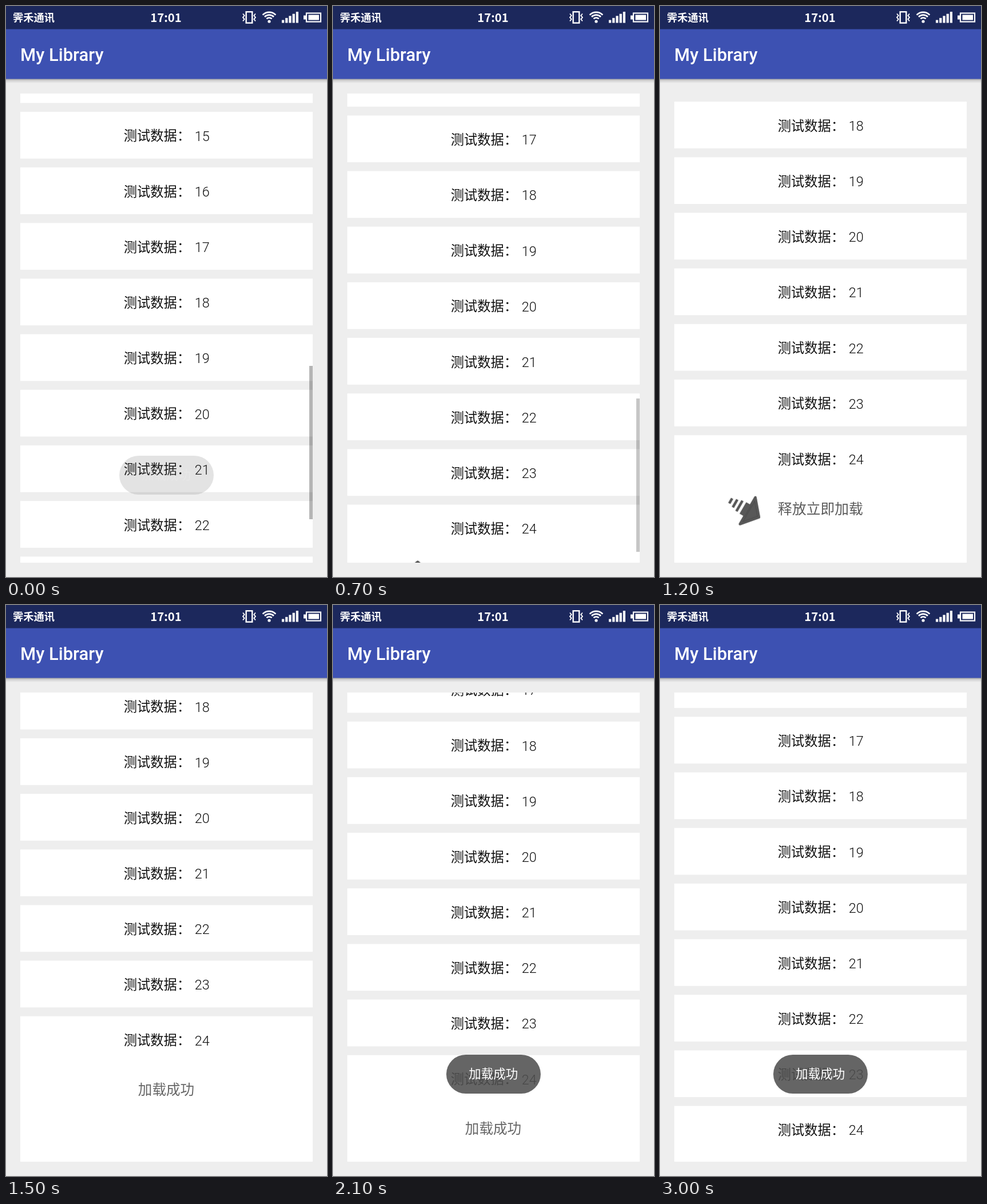
Recreate the animation shown at these times as an HTML page with a canvas. Size 561x998 px, loop 3.4 s.

```html
<!DOCTYPE html>
<html lang="zh-CN">
<head>
<meta charset="utf-8">
<title>My Library</title>
<style>
html, body { margin: 0; width: 100%; height: 100%; overflow: hidden; background: #eee; }
canvas { display: block; width: 561px; height: 998px; }
</style>
</head>
<body>
<canvas id="stage" width="561" height="998"></canvas>
<script>
const ctx = document.getElementById('stage').getContext('2d');
const LOOP = 3400, STEP = 100;
const CJK = '"Noto Sans CJK SC", "Noto Sans CJK", sans-serif';
const LATIN = 'Roboto, sans-serif';
const LIST = { x: 25, y: 153, w: 511, h: 820 };
const FIRST = 14, LAST = 24, PITCH = 97.17, CARD_H = 81.7;

// Resting tops of the last card in each phase.
const FLING_FROM = 1059.5, AT_END = 875.6, PULLED = 718.8, LOADED = 786.8;
const ARM_AT = 1080, LOADED_AT = 1500;

const ramp = (t, from, to) => Math.min(1, Math.max(0, (t - from) / (to - from)));
const easeOut = p => 1 - (1 - p) ** 2;
const easeInOut = p => (1 - Math.cos(Math.PI * p)) / 2;

function lastCardTop(t) {
  return FLING_FROM
    + (AT_END - FLING_FROM) * easeOut(ramp(t, 0, 460))
    + (PULLED - AT_END) * easeInOut(ramp(t, 615, 1445))
    + (LOADED - PULLED) * easeInOut(ramp(t, 1500, 1900))
    + (AT_END - LOADED) * easeInOut(ramp(t, 2400, 3000));
}

function rect(color, x, y, w, h) {
  ctx.fillStyle = color;
  ctx.fillRect(x, y, w, h);
}

function text(str, x, y, size, color, align = 'left', weight = 400, family = CJK) {
  ctx.font = `${weight} ${size}px ${family}`;
  ctx.fillStyle = color;
  ctx.textAlign = align;
  ctx.fillText(str, x, y);
}

function vibrateIcon(x, y) {
  ctx.lineWidth = 2.4;
  ctx.strokeRect(x - 5.3, y - 9.7, 10.6, 19.4);
  ctx.lineWidth = 1.8;
  for (const side of [-1, 1]) {
    ctx.beginPath();
    for (let i = -2; i <= 2; i++) {
      ctx.lineTo(x + side * (i % 2 ? 8.3 : 11), y + i * 3.2);
    }
    ctx.stroke();
  }
}

function wifiIcon(x, y) {
  ctx.lineWidth = 2.7;
  for (let r = 6.5; r < 17; r += 4.8) {
    ctx.beginPath();
    ctx.arc(x, y, r, -Math.PI * 0.75, -Math.PI * 0.25);
    ctx.stroke();
  }
  ctx.beginPath();
  ctx.arc(x, y, 2.6, 0, Math.PI * 2);
  ctx.fill();
}

function signalIcon(x, bottom) {
  for (let i = 0; i < 5; i++) {
    const h = 5 + i * 3.6;
    ctx.fillRect(x + i * 6.2, bottom - h, 4.2, h);
  }
}

function batteryIcon(x, y) {
  ctx.lineWidth = 2.2;
  ctx.strokeRect(x + 5, y, 25, 15);
  ctx.fillRect(x, y + 4, 4, 7);
  ctx.fillRect(x + 8.5, y + 3, 18.5, 9);
}

function header() {
  const shade = ctx.createLinearGradient(0, 127, 0, 135);
  shade.addColorStop(0, 'rgba(0,0,0,.34)');
  shade.addColorStop(0.4, 'rgba(0,0,0,.12)');
  shade.addColorStop(1, 'rgba(0,0,0,0)');
  rect(shade, 0, 127, 561, 8);
  rect('#3d51b2', 0, 40, 561, 87.5);
  rect('#1c285c', 0, 0, 561, 40.5);
  text('霁禾通讯', 12, 27, 18.3, '#fff', 'left', 700);
  text('17:01', 279.5, 28, 20.4, '#fff', 'center', 700);
  text('My Library', 25, 96, 31, '#fff', 'left', 500, LATIN);
  ctx.fillStyle = ctx.strokeStyle = '#fff';
  vibrateIcon(425, 19.9);
  wifiIcon(460, 27);
  signalIcon(482, 29.5);
  batteryIcon(520, 12.5);
}

// Points up at angle 0, with a dashed tail.
function arrow(x, y, angle) {
  ctx.save();
  ctx.translate(x, y);
  ctx.rotate(angle);
  ctx.fillStyle = ctx.strokeStyle = '#585858';
  ctx.shadowColor = 'rgba(0,0,0,.35)';
  ctx.shadowBlur = 2;
  ctx.lineJoin = 'round';
  ctx.lineWidth = 4;
  ctx.beginPath();
  ctx.moveTo(0, -29);
  ctx.lineTo(27, -6);
  ctx.lineTo(-27, -6);
  ctx.closePath();
  ctx.fill();
  ctx.stroke();
  ctx.fillRect(-11.5, -6, 23, 9.5);
  for (let i = 0; i < 3; i++) {
    const half = 10.5 - i * 2.8;
    ctx.fillRect(-half, 8.5 + i * 8.8, half * 2, 4.2);
  }
  ctx.restore();
}

function footer(t, top) {
  const base = top + 137.5;
  if (t >= LOADED_AT) {
    text('加载成功', 280, base, 24.6, '#666', 'center');
    return;
  }
  const caption = t < ARM_AT ? '上拉加载更多' : '释放立即加载';
  text(caption, 280.5, base, 24.8, '#5c5c5c', 'center');
  arrow(148, top + 129, Math.PI * ramp(t, ARM_AT, ARM_AT + 180));
}

function scrollbar(t, lastTop) {
  const top = Math.min(686, 629 + (FLING_FROM - lastTop) * 0.322);
  const alpha = 0.29 * (1 - ramp(t, 640, 900));
  rect(`rgba(0,0,0,${alpha})`, 530, top, 6, 268);
}

function list(t) {
  const lastTop = lastCardTop(t);
  ctx.save();
  ctx.beginPath();
  ctx.rect(LIST.x, LIST.y, LIST.w, LIST.h);
  ctx.clip();
  for (let n = FIRST; n <= LAST; n++) {
    const top = lastTop - (LAST - n) * PITCH;
    rect('#fff', LIST.x, top, LIST.w, n === LAST ? LIST.h : CARD_H);
    text('测试数据：', 205.7, top + 50.5, 23.3, '#111');
    text(n, 355.8, top + 50.8, 23.5, '#111', 'right', 300, LATIN);
  }
  footer(t, lastTop);
  scrollbar(t, lastTop);
  ctx.restore();
}

function toast(alpha) {
  ctx.save();
  ctx.globalAlpha = alpha;
  ctx.fillStyle = 'rgba(80,80,80,.88)';
  ctx.beginPath();
  ctx.roundRect(198, 786, 165, 68, 34);
  ctx.fill();
  text('加载成功', 280.3, 826.5, 21.5, '#fff', 'center');
  ctx.restore();
}

function draw(now) {
  const t = Math.floor((now % LOOP) / STEP) * STEP;
  rect('#eee', 0, 0, 561, 998);
  list(t);
  header();
  toast(0.18 * (1 - ramp(t, 0, STEP)) + ramp(t, 1800, 2100));
}

const start = performance.now();
function tick() {
  draw(performance.now() - start);
  requestAnimationFrame(tick);
}
tick();
</script>
</body>
</html>
```
